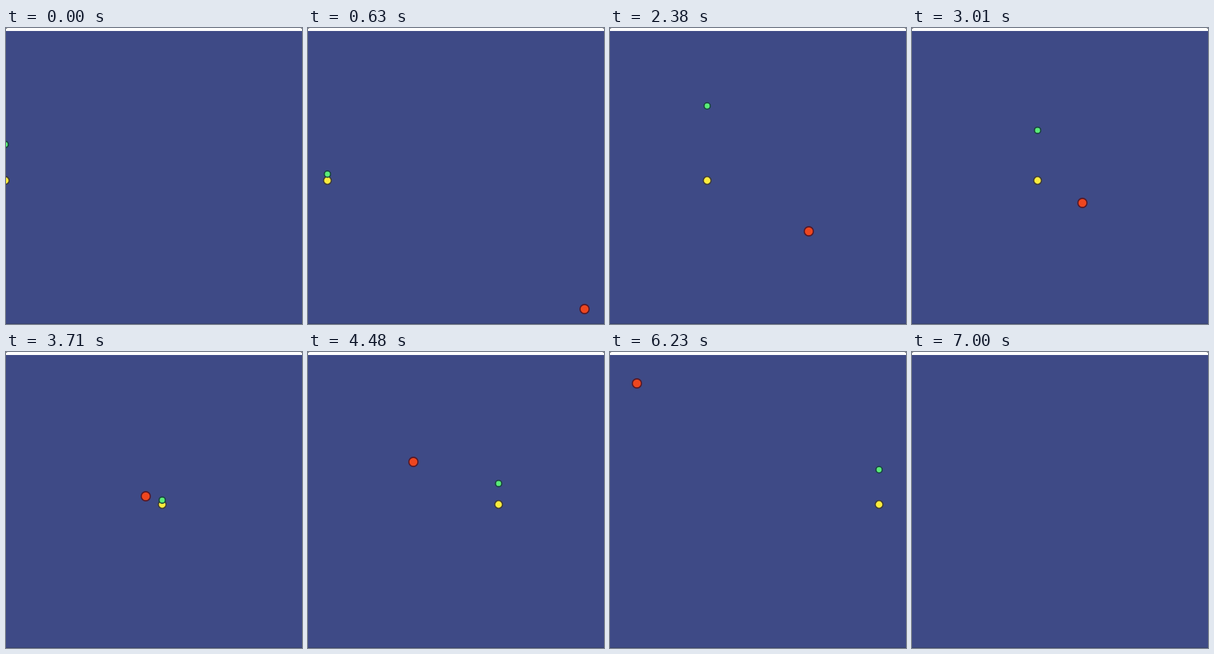
Animation of 396x396 px, one loop 7070 ms. Source, as an HTML page:

```html
<!DOCTYPE html>
<html>
<head>
<meta charset="utf-8">
<style>
  html, body { margin: 0; width: 100%; height: 100%; overflow: hidden; background: #3e4a86; }
  svg { display: block; width: 100vw; height: 100vh; }
</style>
</head>
<body>
<svg viewBox="0 0 396 396">
  <rect width="396" height="396" fill="#3e4a86"/>
  <rect y="395" width="396" height="1" fill="#38426f"/>
  <rect width="396" height="4" fill="#fff"/>
  <path d="M0 0h2l-2 1.5zM396 0h-2l2 1.5z" fill="#777"/>
  <g transform="translate(-2 4)" stroke-width="1.6">
    <circle id="yellow" r="5.2" fill="#fdec3c" stroke="#3f3c34"/>
    <circle id="green" r="4.2" fill="#5aec78" stroke="#17433c"/>
    <circle id="red" r="6.1" fill="#ee461f" stroke="#571826"/>
  </g>
</svg>
<script>
const LOOP = 7070, STEP = 70;
const [yellow, green, red] = ["yellow", "green", "red"].map(id => document.getElementById(id));

// Steady pace after a short, slow start
function distance(n) {
  return Math.round(4.168 * n - 5.25 + 6.25 * Math.exp(-n / 2));
}

function place(ball, x, y) {
  ball.setAttribute("cx", x);
  ball.setAttribute("cy", y);
}

function draw(ms) {
  const n = Math.max(0, Math.floor((ms % LOOP) / STEP) - 1);
  const x = distance(n);
  place(yellow, x, 200);
  place(green, x, 150 + 50 * Math.sin(x * Math.PI / 90));
  place(red, 400 - x, 400 - x);
}

const start = performance.now();
function tick() {
  draw(performance.now() - start);
  requestAnimationFrame(tick);
}
tick();
</script>
</body>
</html>
```
